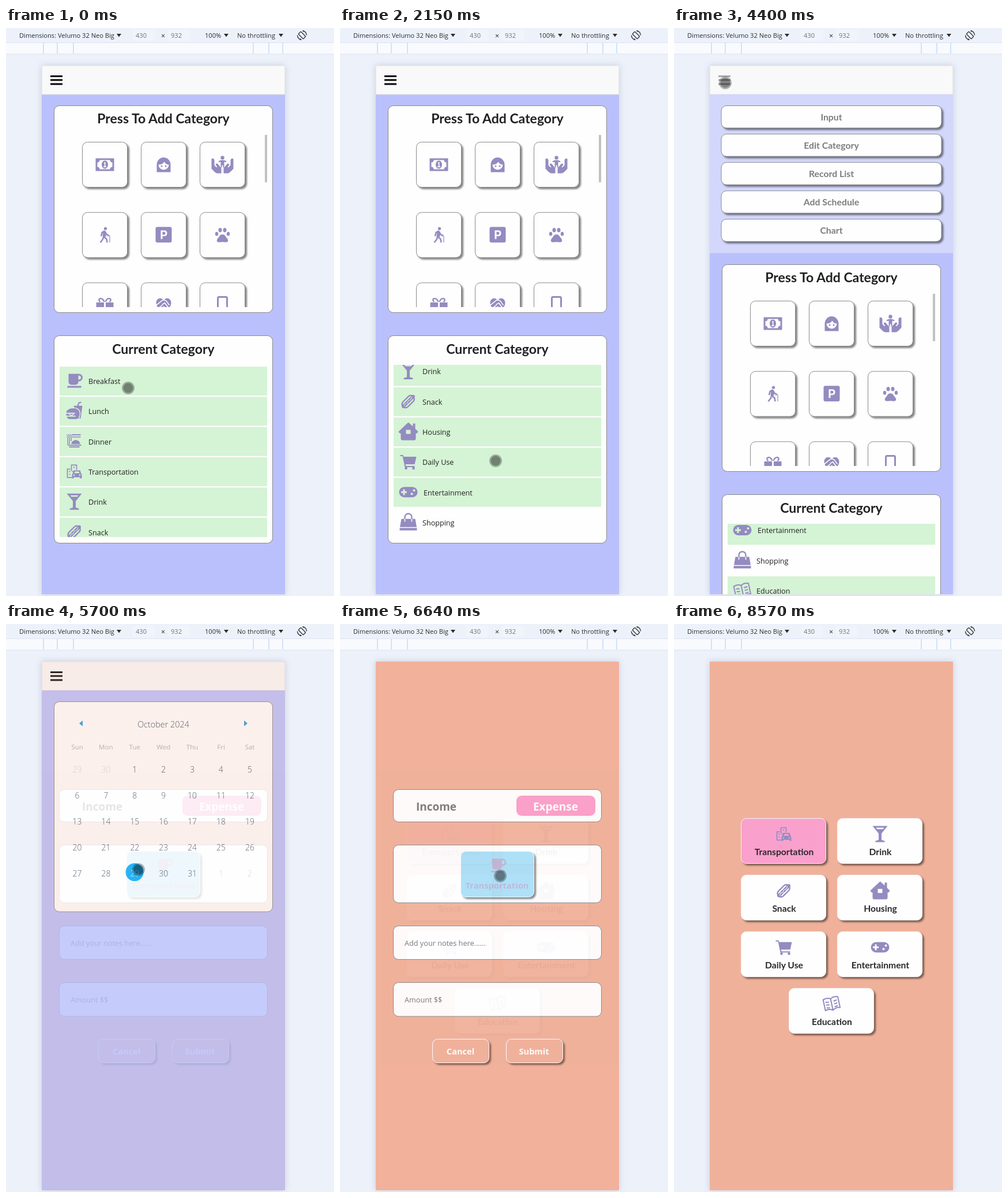
An HTML page that plays this animation: 569 px wide and 983 px high, repeating every 9.1 s.

```html
<!DOCTYPE html>
<html lang="en">
<head>
<meta charset="utf-8">
<title>Category editor</title>
<style>
html, body { margin: 0; width: 100%; height: 100%; overflow: hidden; background: #ecf1fa; }
svg { display: block; width: 100%; height: 100%; }
text { font-family: "Open Sans", "Noto Sans", sans-serif; white-space: pre; }
.lato { font-family: Lato, sans-serif; font-weight: 700; }
.mid { text-anchor: middle; }
.icon { fill: #948bc0; stroke: none; fill-rule: evenodd; }
.icon .line { fill: none; stroke: #948bc0; stroke-width: 2.4; }
.icon .cut { fill: var(--bg, #fff); stroke: none; }
.icon .gap { fill: none; stroke: var(--bg, #fff); stroke-width: 1.6; }
.raised { filter: drop-shadow(3px 3px 1.5px rgba(0, 0, 0, .48)); }
</style>
</head>
<body>
<svg id="stage" viewBox="0 0 569 983" xmlns="http://www.w3.org/2000/svg"></svg>
<script>
const LOOP = 9100;
const BLUE = '#b9c0fb', PEACH = '#f0b19b', GREEN = '#d5f3d5', PINK = '#fba0cc', EDGE = '#8a8a8e';

const icons = {
  cup: '<path d="M-10-12H8a6 6 0 0 1 0 13H7v1a5 5 0 0 1-5 5H-5a5 5 0 0 1-5-5zM7-9v7h1a3.5 3.5 0 0 0 0-7zM-12 9H12v3H-12z"/>',
  burger: '<path d="M-1-9H5L7-15 12-16V-14L8.500-13 7.500-9H14L11 13H3z"/><path class="gap" stroke-width="3" d="M-14 4C-13-9 9-9 10 4L8 13"/><path d="M-14 3C-13-7 8-7 9 3zM-14 5H9V8H-14zM-13 10H8Q7 14 3 14H-8Q-12 14-13 10z"/><path class="gap" d="M-9 5l4 3 4-3"/>',
  dinner: '<path d="M-13-12H11V-10H-13zM-13-8H11V-6.500H-13zM-12-12h1.500V7H-12zM-9-12h1.500V7H-9zM-6-12h1.500V0H-6zM-5 5C-5-4 10-4 10 5zM-11 6H12V8H-11zM-9 9H9V11H-9z"/>',
  transport: '<path class="line" stroke-width="1.700" style="stroke-width:1.700" d="M-12 11V-4H-7M-5-1V-11H4V-3M-12 10.500H-4"/><path d="M-1.500-8h2v2h-2zM-9-1h2v2h-2zM-9 4h2v2h-2zM-4-1h2v2h-2zM-3 4L-1-2H10L12 4 13 5V12H10V10H-1V12H-4V5zM0 3H9L8 0H1z"/><circle class="cut" cx="-.5" cy="6.500" r="1.300"/><circle class="cut" cx="9.500" cy="6.500" r="1.300"/>',
  drink: '<path d="M-13-14H13L2.500-1V10L8 12V14H-8V12L-2.500 10V-1zM-7-11L-5-8.500H5L7-11z"/>',
  snack: '<g transform="rotate(-45)"><rect class="line" x="-13" y="-6" width="25" height="12" rx="6"/><rect x="-15" y="-2.700" width="30" height="5.400" rx="2.700"/><path class="gap" style="stroke-width:1" d="M-11 1L-7-1-3 1 1-1 5 1 10-1"/></g>',
  house: '<path d="M0-16L8-9V-14H12V-5L17 0 15 3H13V12Q13 15 10 15H-10Q-13 15-13 12V3H-15L-17 0zM-4-3V4H4V-3z"/>',
  cart: '<path d="M-14-12H-9L-8-9H14L11 4H-5L-4 7H11V9H-6L-10-10H-14z"/><circle cx="-4" cy="11" r="2.300"/><circle cx="9" cy="11" r="2.300"/>',
  gamepad: '<rect x="-16" y="-9" width="32" height="18" rx="9"/><path class="cut" d="M-9-5h3v3.500h3.500v3H-6V5H-9V1.500h-3.500v-3H-9z"/><circle class="cut" cx="6" cy="3" r="2"/><circle class="cut" cx="10" cy="-3" r="2"/>',
  bag: '<path d="M-12-6H12L15 11V14H-15V11z"/><path class="line" d="M-6-5V-9A6 6 0 0 1 6-9V-5"/><path class="gap" d="M-15 9H15M-6-6V-1M6-6V-1"/>',
  book: '<g transform="rotate(-12)"><path class="line" style="stroke-width:2" d="M0-9Q-6-13-13-10V9Q-6 7 0 11 6 7 13 9V-10Q6-13 0-9zV11M-10-5l6 1M-10 0l6 1M-10 5l6 1M10-5l-6 1M10 0l-6 1M10 5l-6 1"/></g>',
  invoice: '<path d="M-9-15H3V-7H11V12Q11 15 8 15H-8Q-11 15-11 12V-13Q-11-15-9-15zM5-15L11-9H5z"/><path class="gap" d="M-8-11H-1M-8-7H-1"/><path class="gap" d="M4-.5Q-3.500-3-3.500 1 -3.500 3 0 4 3.500 5 3 7 2 10-4 8M0-4V12"/>',
  shirt: '<path class="line" style="stroke-width:2" d="M-5-12Q0-7 5-12L13-7 10 0 7-1V12H-7V-1L-10 0-13-7z"/>',
  medkit: '<path d="M-12-9H-10V13H-12Q-15 13-15 10V-6Q-15-9-12-9zM10-9H12Q15-9 15-6V10Q15 13 12 13H10zM-8-9H8V13H-8z"/><path class="line" d="M-5-9V-13H5V-9"/><path class="cut" d="M-2-5H2V0H7V4H2V9H-2V4H-7V0H-2z"/>',
  money: '<path d="M-16-11H16V11H-16zM-13-4V4Q-9 4-9 8H9Q9 4 13 4V-4Q9-4 9-8H-9Q-9-4-13-4z"/><ellipse cx="0" cy="0" rx="5.500" ry="7"/><path class="cut" d="M-2-3L0-4.500H1V3H2.500V4.500H-2.500V3H-.7V-2z"/>',
  face: '<path d="M-12 13V0A12 12.500 0 0 1 12 0V13z"/><path class="cut" d="M-9 0Q-2 0 1-5 4 0 9 0A9 9 0 0 1-9 0z"/><circle cx="-3.500" cy="2.500" r="1.500"/><circle cx="3.500" cy="2.500" r="1.500"/>',
  hands: '<circle cx="0" cy="-12" r="3.200"/><path d="M-7-6Q0-10 7-6L6-4 3-5V5H1V1H-1V5H-3V-5L-6-4z"/><path id="hand" d="M-19-10Q-15-12-14-8V1L-11 4Q-10 5-9 4L-12 0Q-10-4-7 0L-2 6V15H-9Q-12 15-19 7z"/><path d="M19-10Q15-12 14-8V1L11 4Q10 5 9 4L12 0Q10-4 7 0L2 6V15H9Q12 15 19 7z"/>',
  walker: '<circle cx="1" cy="-11" r="2.600"/><path class="line" style="stroke-width:2.600" d="M0-7L-5-4-6.500 2M0-7L-2 3 3 7 4 13M-2 3L-4 8-8 13M0-6L3-1 7 1"/><path d="M-3-7L2-6 2 3-4 3z"/><path class="line" style="stroke-width:1.200" d="M5 3Q7-1 8.500 2V13"/>',
  parking: '<path d="M-11-14H11Q14-14 14-11V10Q14 13 11 13H-11Q-14 13-14 10V-11Q-14-14-11-14zM-5-8V7H-2V2H1Q6 2 6-3T1-8zM-2-5.500H1Q3-5.500 3-3T1-.5H-2z"/>',
  paw: '<ellipse cx="-10" cy="-2" rx="2.700" ry="3.500"/><ellipse cx="-4" cy="-8.500" rx="3" ry="3.800"/><ellipse cx="4" cy="-8.500" rx="3" ry="3.800"/><ellipse cx="10" cy="-2" rx="2.700" ry="3.500"/><path d="M0-1C5-1 6 4 9 7 12 13 6 13 0 12-6 13-12 13-9 7-6 4-5-1 0-1z"/>',
  gift: '<path class="line" d="M-1-6C-4-16-15-11-8-6M1-6C4-16 15-11 8-6"/><path d="M-15-5H-1.500V3H-15zM1.500-5H15V3H1.500zM-13 5H-1.500V15H-13zM1.500 5H13V15H1.500z"/>',
  heart: '<path d="M0-9C-5-15-13-12-13-4-13 3-5 9 0 13 5 9 13 3 13-4 13-12 5-15 0-9z"/><path class="gap" d="M-13 0L-3-8Q1-11 5-7L10 0M-3-1L2-4 8 4M-7 3L-2 0M-4 7L1 2"/>',
  phone: '<rect class="line" style="stroke-width:3" x="-8" y="-14.500" width="16" height="34" rx="2"/>'
};

const rect = (x, y, w, h, r, fill, more = '') =>
  `<rect x="${x}" y="${y}" width="${w}" height="${h}" rx="${r}" fill="${fill}" ${more}/>`;
const label = (s, x, y, size, fill, more = '') =>
  `<text x="${x}" y="${y}" font-size="${size}" fill="${fill}" ${more}>${s}</text>`;
const title = (s, y, size = 23, fill = '#212124') => label(s, 273, y, size, fill, 'class="lato mid"');
const icon = (name, x, y, more = '') => `<g class="icon" transform="translate(${x} ${y})" ${more}>${icons[name]}</g>`;
const panel = (x, y, w, h) => rect(x, y, w, h, 9, '#fefefe', `stroke="${EDGE}"`);
const raised = (x, y, w, h, fill = '#fefefe', edge = EDGE) =>
  rect(x, y, w, h, 9, fill, `stroke="${edge}" class="raised"`);
const clip = (id, x, y, w, h) => `<clipPath id="${id}">${rect(x, y, w, h, 0, '#000')}</clipPath>`;

const ROW = 52.3;
const rows = [
  ['Breakfast', 'cup', 1], ['Lunch', 'burger', 1], ['Dinner', 'dinner', 1], ['Transportation', 'transport', 1],
  ['Drink', 'drink', 1], ['Snack', 'snack', 1], ['Housing', 'house', 1], ['Daily Use', 'cart', 1],
  ['Entertainment', 'gamepad', 1], ['Shopping', 'bag', 0], ['Education', 'book', 0],
  ['Utilities', 'invoice', 0], ['Clothing', 'shirt', 0], ['Medical', 'medkit', 0]
];
const textX = { Entertainment: 145, Utilities: 135.5 };

function toolbar() {
  const ink = '#2b2d31', arrow = x => `<path d="M${x - 4} 10h8l-4 5.500z" fill="${ink}"/>`;
  const ticks = [65, 89, 117, 429, 456, 480].map(x => `M${x} 26V44`).join('');
  return rect(0, 0, 569, 25, 0, '#edf2fa') + rect(0, 25, 569, 20, 0, '#f8fafe') +
    `<path d="M0 25.500H569M0 45H569" stroke="#dce5f2"/><path d="${ticks}" stroke="#c3daf8" stroke-width="1.500"/>` +
    rect(220, 3, 38, 19, 2, '#f0f4fb') + rect(281, 3, 38, 19, 2, '#f0f4fb') +
    label('Dimensions: Velumo 32 Neo Big', 23, 17, 11.1, ink) + arrow(196) +
    label('430', 225, 17, 11.1, '#70747a') + label('×', 269, 18, 12.5, ink) +
    label('932', 286, 17, 11.1, '#70747a') +
    label('100%', 345, 17, 11.1, ink) + arrow(382) + label('No throttling', 401, 17, 11.1, ink) + arrow(477) +
    `<g transform="translate(513.500 12.500)" fill="none" stroke="#3c3f44" stroke-width="1.500">
      <rect x="-3" y="-6" width="6" height="12" rx="1" transform="rotate(-45)"/>
      <path d="M1-8A8 8 0 0 1 8 0M-1 8A8 8 0 0 1-8 0M1-8l2.500 2M-1 8l-2.500-2"/></g>`;
}

function menu() {
  const names = ['Input', 'Edit Category', 'Record List', 'Add Schedule', 'Chart'];
  return rect(62, 115, 422, 274.5, 0, '#d3d7fb') + names.map((s, i) =>
    raised(82, 134.5 + i * 49.1, 382, 38.5) + title(s, 159.5 + i * 49.1, 15.8, '#7d7d80')).join('');
}

function categoryPage() {
  const grid = ['money', 'face', 'hands', 'walker', 'parking', 'paw', 'gift', 'heart', 'phone'];
  const tiles = grid.map((name, i) => {
    const x = 132.5 + i % 3 * 102, y = 197.5 + Math.floor(i / 3) * 121.7;
    return raised(x, y, 78, 78) + icon(name, x + 39, y + 39);
  }).join('');
  const list = rows.map(([name, pic], i) => {
    const y = 586 + i * ROW;
    return `<g class="row">${rect(93, y, 360, 50, 0, GREEN)}${icon(pic, 118.5, y + 24.5)}` +
      label(name, textX[name] || 143, y + 30, 12.6, '#222') + '</g>';
  }).join('');
  return panel(83.5, 134.5, 379, 358) + title('Press To Add Category', 165) +
    `<g clip-path="url(#gridClip)">${tiles}</g>` + rect(449, 185, 4, 82, 0, '#c1c1c3') +
    panel(83.5, 532.5, 379, 359) + title('Current Category', 564) +
    `<g clip-path="url(#listClip)"><g id="list">${list}</g></g>`;
}

function calendarPage() {
  const colX = i => 123.5 + 49.9 * i;
  let s = rect(62, 115, 422, 865, 0, BLUE) + panel(83.5, 134.5, 379, 363.5) +
    label('October 2024', 273, 179, 14.4, '#34475a', 'class="mid" font-weight="300"') +
    '<path d="M127 172l6-5v10zM419 172l-6-5v10z" fill="#1d9fe8"/>' +
    '<circle cx="223" cy="429.500" r="15.500" fill="#0aa9f4"/>';
  ['Sun', 'Mon', 'Tue', 'Wed', 'Thu', 'Fri', 'Sat'].forEach((d, i) => {
    s += label(d, colX(i), 216.5, 11.6, '#a9adb5', 'class="mid"');
  });
  for (let i = 0; i < 35; i++) {
    const day = i - 1, out = day < 1 || day > 31;
    const n = day < 1 ? day + 30 : day > 31 ? day - 31 : day;
    const fill = out ? '#d2d2d6' : day === 29 ? '#d5effc' : '#34475a';
    s += label(n, colX(i % 7), 257 + Math.floor(i / 7) * 45.1, 13.8, fill, 'class="mid" font-weight="300"');
  }
  return s;
}

function formPage() {
  const bold = (s, x, y, size, fill) => label(s, x, y, size, fill, 'class="mid" font-weight="700"');
  return rect(62, 65, 422, 915, 0, PEACH) +
    panel(92.5, 286.5, 361, 56) + bold('Income', 167, 322.5, 19, '#7a7a7d') +
    rect(306, 297, 137, 35, 9, PINK) + bold('Expense', 374, 322.5, 19, '#fff') +
    panel(92.5, 382.5, 361, 100) + raised(209.5, 393.5, 127, 79, '#abe0f8', '#f4fafd') +
    icon('cup', 274, 418, 'style="fill:#bfb6d6;--bg:#abe0f8"') + bold('Transportation', 272.5, 458, 14.7, '#bcb6d8') +
    panel(92.5, 522.5, 361, 58) + label('Add your notes here......', 112, 557, 12.7, '#757579') +
    panel(92.5, 620.5, 361, 58.5) + label('Amount $$', 112, 655, 12.7, '#757579') +
    raised(160.5, 718.5, 98, 41, PEACH, '#fff') + bold('Cancel', 209, 745, 14.6, '#fff') +
    raised(288.5, 718.5, 98, 41, PEACH, '#fff') + bold('Submit', 336.5, 745, 14.6, '#fff');
}

function pickPage() {
  const cards = rows.slice(3, 9).concat([rows[10]]);
  return rect(62, 65, 422, 915, 0, PEACH) + cards.map(([name, pic], i) => {
    const x = i === 6 ? 199.5 : 116.5 + i % 2 * 167, y = 336.5 + Math.floor(i / 2) * 98;
    const fill = i ? '#fefefe' : '#faa0cc';
    return raised(x, y, 147, 78, fill, '#f4f4f6') + icon(pic, x + 74, y + 27, `style="--bg:${fill}"`) +
      label(name, x + 74.5, y + 63, 15.7, '#2a2a2d', 'class="lato mid"');
  }).join('');
}

const stage = document.getElementById('stage');
stage.innerHTML = `<defs>${clip('device', 62, 65, 422, 915)}${clip('gridClip', 93, 185, 360, 298)}${clip('listClip', 93, 583, 360, 298)}</defs>` +
  rect(0, 0, 569, 983, 0, '#ecf1fa') + toolbar() +
  rect(62, 65, 422, 915, 0, BLUE, 'style="filter:drop-shadow(0 0 6px rgba(60,70,100,.2))"') +
  `<g clip-path="url(#device)">${rect(62, 65, 422, 50, 0, '#f9f9f9', 'stroke="#dcdcdf"')}
    <path id="bars" d="M77 83.500H98M77 90H98M77 97H98" stroke="#050505" stroke-width="3"/>
    <g id="menu">${menu()}</g><g id="category">${categoryPage()}</g>
    <g id="calendar">${calendarPage()}</g><g id="form">${formPage()}</g><g id="pick">${pickPage()}</g></g>
  <g id="cursor"><circle r="11"/><circle r="8.500"/></g>`;

const el = Object.fromEntries(['bars', 'menu', 'category', 'list', 'calendar', 'form', 'pick', 'cursor']
  .map(id => [id, document.getElementById(id)]));
const rowEls = [...document.querySelectorAll('.row')];

// [time, x, y]
const path = [
  [0, 212, 623], [280, 212, 623], [390, 178, 672], [590, 178, 672], [700, 227, 727], [1060, 227, 727],
  [1320, 270, 749], [2920, 270, 749], [3170, 163, 698], [3450, 163, 698], [3780, 96, 111], [3860, 96, 111],
  [4000, 89, 95], [4420, 89, 95], [4590, 215, 156], [4980, 215, 156], [5250, 222, 428], [5380, 222, 428],
  [5500, 230, 425], [6080, 230, 425], [6350, 278, 436], [7530, 278, 436], [7800, 236, 570],
  [8000, 298, 706], [8170, 352, 697], [8410, 352, 697], [8565, 510, 918]
];
const scroll = [[1360, 0], [1550, 140], [1700, 140], [1860, 205], [1990, 205], [2860, 435]];
const toggles = { 0: 100, 1: 400, 2: 720, 10: 3200 };
const presses = [90, 390, 710, 3180, 4320, 4840, 5540, 6480];
const MENU_OPEN = 4340;

const ramp = (t, a, b) => Math.min(1, Math.max(0, (t - a) / (b - a)));
function track(keys, t, n) {
  let i = 0;
  while (i < keys.length - 2 && t >= keys[i + 1][0]) i++;
  const a = keys[i], b = keys[i + 1], k = ramp(t, a[0], b[0]), e = k * k * (3 - 2 * k);
  return a[n] + (b[n] - a[n]) * e;
}
const fade = (node, v) => {
  node.setAttribute('opacity', v);
  node.style.display = v > 0 ? '' : 'none';
};

function draw(t) {
  rowEls.forEach((row, i) => {
    const start = toggles[i], flipped = start !== undefined && t >= start;
    const color = !!rows[i][2] !== flipped ? GREEN : '#fefefe';
    row.firstChild.setAttribute('fill', color);
    row.style.setProperty('--bg', color);
    row.setAttribute('opacity', flipped ? ramp(t, start, start + 260) : 1);
  });
  el.list.setAttribute('transform', `translate(0 ${-track(scroll, t, 1)})`);

  const open = t >= MENU_OPEN;
  fade(el.menu, open ? 1 : 0);
  el.category.setAttribute('transform', `translate(0 ${open ? 275 : 0})`);
  el.bars.setAttribute('opacity', open ? ramp(t, MENU_OPEN - 25, 4580) : 1);
  fade(el.calendar, ramp(t, 4860, 5010));
  fade(el.form, ramp(t, 5650, 5930));
  fade(el.pick, ramp(t, 6630, 6910));

  const [ring, core] = el.cursor.children;
  const pressed = presses.some(p => t >= p && t < p + 75);
  ring.setAttribute('fill', pressed ? 'rgba(226,221,50,.86)' : 'rgba(0,0,0,.28)');
  core.setAttribute('fill', pressed ? 'rgba(0,0,0,.17)' : 'rgba(0,0,0,.26)');
  el.cursor.setAttribute('transform', `translate(${track(path, t, 1)} ${track(path, t, 2)})`);
  fade(el.cursor, t < 8565 ? 1 : 0);
}

const began = performance.now();
function tick() {
  draw((performance.now() - began) % LOOP);
  requestAnimationFrame(tick);
}
tick();
</script>
</body>
</html>
```
